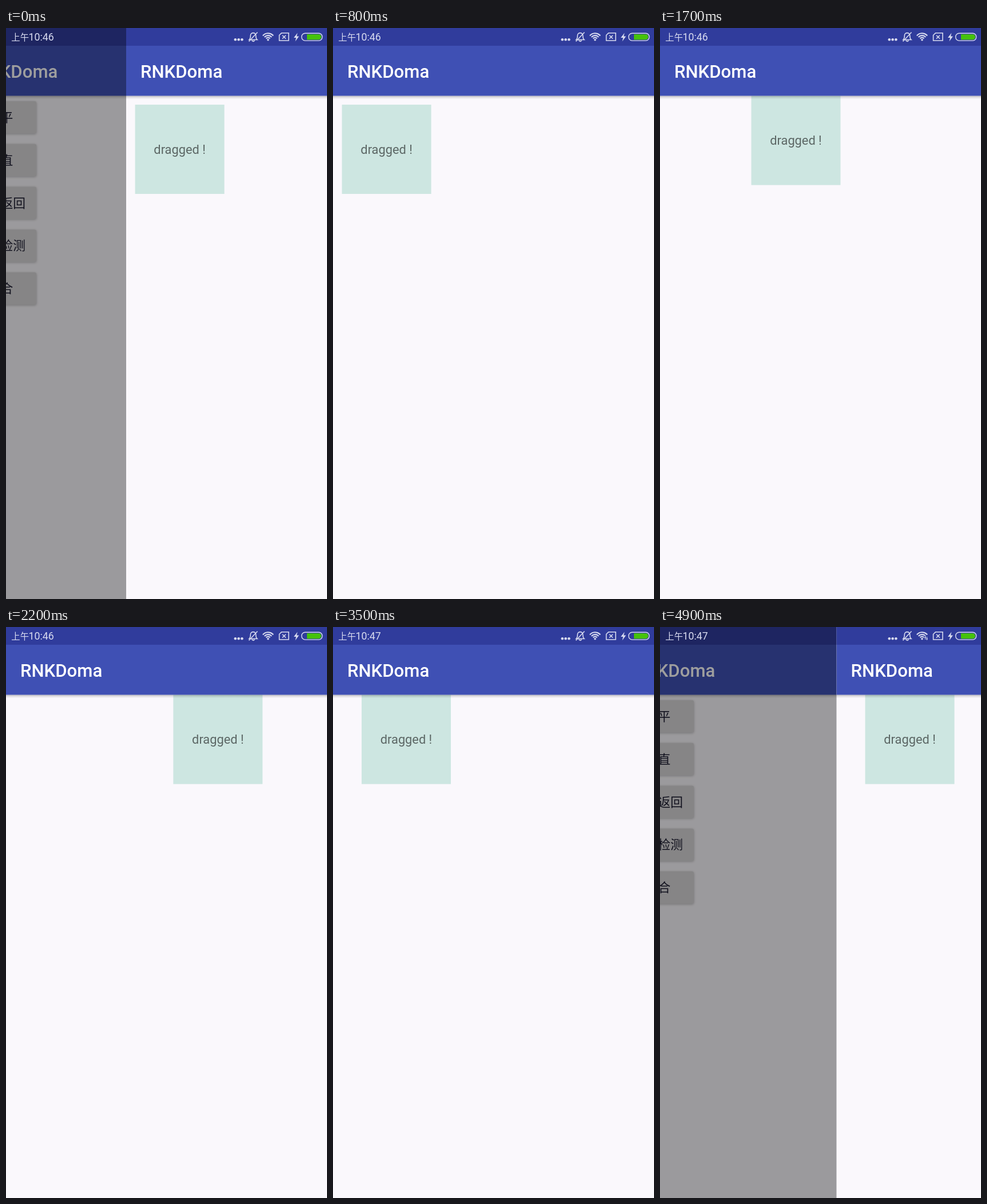
An HTML page with a canvas that plays this animation: 561x998 px, repeating every 5000 ms.

```html
<!DOCTYPE html>
<html lang="zh">
<head>
<meta charset="utf-8">
<title>Drag demo</title>
<style>
html, body { margin: 0; width: 100%; height: 100%; overflow: hidden; background: #faf8fc; }
canvas { display: block; }
</style>
</head>
<body>
<canvas id="stage" width="561" height="998"></canvas>
<script>
const W = 561, H = 998, LOOP = 5000, STEP = 100;
const STATUS_H = 31, BAR_BOTTOM = 118.5, BOX = 156, HOME = 15.6;
const TITLE = 'RNKDoma';
const LABELS = ['水平', '垂直', '移动返回', '边缘检测', '综合'];
const PAPER = '#faf8fc', STATUS = '#303c9c', ICON = '#d9dcf0';
const CJK = '"Noto Sans CJK SC", "Noto Sans CJK", sans-serif';
const SANS = 'Roboto, ' + CJK;
const ctx = document.getElementById('stage').getContext('2d');

const clamp = u => Math.min(1, Math.max(0, u));
const smooth = u => u * u * (3 - 2 * u);
const easeOut = u => 1 - (1 - u) ** 2.24;

// The finger's turning points: each swing starts and ends at rest.
const turns = [
  { at: 1200, x: HOME }, { at: 1600, x: 244 }, { at: 1800, x: 75 },
  { at: 2100, x: 307.5 }, { at: 2400, x: 249 }, { at: 2500, x: 252 }
];

function boxX(t) {
  let x = HOME;
  for (let i = 1; i < turns.length; i++) {
    const a = turns[i - 1], b = turns[i];
    x += (b.x - a.x) * smooth(clamp((t - a.at) / (b.at - a.at)));
  }
  return x + (50 - x) * easeOut(clamp((t - 2700) / 300));
}

// The page slides in with a decaying speed and is swiped away at the end.
function pageX(t) {
  if (t < 600) return 210 * Math.exp(-t / 150);
  return t < 4900 ? 0 : W * .55;
}

function rect(x, y, w, h, color) {
  ctx.fillStyle = color;
  ctx.fillRect(x, y, w, h);
}

function text(str, x, y, font, color, align = 'left') {
  ctx.font = font;
  ctx.fillStyle = color;
  ctx.textAlign = align;
  ctx.fillText(str, x, y);
}

function pill(x, y, w, h, r) {
  ctx.beginPath();
  ctx.roundRect(x, y, w, h, r);
}

function poly(...points) {
  ctx.beginPath();
  points.forEach(([x, y]) => ctx.lineTo(x, y));
  ctx.closePath();
}

function line(x0, y0, x1, y1) {
  ctx.beginPath();
  ctx.moveTo(x0, y0);
  ctx.lineTo(x1, y1);
  ctx.stroke();
}

function disc(x, y, r) {
  ctx.beginPath();
  ctx.arc(x, y, r, 0, Math.PI * 2);
  ctx.fill();
}

function clipped(left, right, shift, paint) {
  ctx.save();
  ctx.beginPath();
  ctx.rect(left, 0, right - left, H);
  ctx.clip();
  ctx.translate(shift, 0);
  paint();
  ctx.restore();
}

function bars() {
  const shade = ctx.createLinearGradient(0, BAR_BOTTOM, 0, BAR_BOTTOM + 6);
  shade.addColorStop(0, 'rgba(0,0,0,.28)');
  shade.addColorStop(.4, 'rgba(0,0,0,.11)');
  shade.addColorStop(1, 'rgba(0,0,0,0)');
  rect(0, BAR_BOTTOM, W, 6, shade);
  rect(0, 0, W, BAR_BOTTOM, '#3f50b4');
  rect(0, 0, W, STATUS_H, STATUS);
  text(TITLE, 25, 87, '500 31.16px ' + SANS, '#fff');
}

function menuPage() {
  rect(0, 0, W, H, PAPER);
  LABELS.forEach((label, i) => {
    const y = 128 + 74.8 * i;
    ctx.save();
    ctx.shadowColor = 'rgba(0,0,0,.25)';
    ctx.shadowBlur = 4;
    ctx.shadowOffsetY = 1;
    ctx.fillStyle = '#d7d6d8';
    pill(6, y, 125, 56.5, 3);
    ctx.fill();
    ctx.restore();
    text(label, 68.5, Math.round(y + 36), '21.8px ' + CJK, '#1c1c30', 'center');
  });
  bars();
}

function dragPage(t) {
  const x = boxX(t), y = t < 1300 ? 134 : BAR_BOTTOM;
  rect(0, 0, W, H, PAPER);
  rect(x, y, BOX, BOX, '#cde6e1');
  text('dragged !', x + BOX / 2, Math.round(y + 85.7), '21.8px ' + SANS, '#5c6765', 'center');
  bars();
}

function bell() {
  ctx.lineWidth = 1.6;
  ctx.beginPath();
  ctx.moveTo(425, 20.5);
  ctx.quadraticCurveTo(427.3, 18.5, 427.3, 13.5);
  ctx.bezierCurveTo(427.3, 7, 436.7, 7, 436.7, 13.5);
  ctx.quadraticCurveTo(436.7, 18.5, 439, 20.5);
  ctx.closePath();
  ctx.stroke();
  ctx.beginPath();
  ctx.arc(432, 21, 2.3, .2, Math.PI - .2);
  ctx.stroke();
  line(439.5, 7.5, 424.5, 23.5);
}

// A small vertical arrow; dir is -1 for up and 1 for down.
function arrow(x, dir) {
  const tip = 19.5 + 3.5 * dir;
  poly([x - 1.6, tip - 3 * dir], [x, tip], [x + 1.6, tip - 3 * dir]);
  ctx.fill();
  line(x, tip, x, tip - 6 * dir);
}

function wifi(busy) {
  ctx.lineWidth = 2.1;
  for (let i = 0; i < 3; i++) {
    ctx.beginPath();
    ctx.arc(458, 21.5, 4.6 + 3.8 * i, -Math.PI * .77, -Math.PI * .23);
    ctx.stroke();
  }
  disc(458, 20.7, 1.8);
  if (!busy) return;
  rect(461.5, 15.5, 7, 8, STATUS);
  ctx.fillStyle = ICON;
  ctx.lineWidth = 1;
  arrow(463.6, -1);
  arrow(466.5, 1);
}

function simCard() {
  ctx.lineWidth = 1.6;
  poly([481.5, 8.8], [494, 8.8], [494, 22], [477.6, 22], [477.6, 12.5]);
  ctx.stroke();
  for (const d of [-3, 3]) line(486 - d, 12.7, 486 + d, 18.7);
}

function battery() {
  poly([509.5, 8.5], [503, 17], [507, 17], [505.5, 23.5], [512, 14.5], [508, 14.5]);
  ctx.fill();
  ctx.lineWidth = 1.4;
  pill(516.7, 9.3, 36, 12.8, 6);
  ctx.stroke();
  ctx.fillStyle = '#45c20c';
  pill(526, 11, 25, 9.4, [0, 4.5, 4.5, 0]);
  ctx.fill();
}

function statusBar(t) {
  text('上午', 9.3, 22, '15.4px ' + CJK, ICON);
  text(t < 3500 ? '10:46' : '10:47', 39.5, 22.4, '17.8px ' + SANS, ICON);
  ctx.fillStyle = ctx.strokeStyle = ICON;
  for (let i = 0; i < 3; i++) disc(400.8 + i * 5.8, 20.2, 2.3);
  bell();
  wifi((t >= 1800 && t < 2100) || t >= 4700);
  simCard();
  battery();
}

function draw(time) {
  const t = Math.floor((time % LOOP) / STEP) * STEP;
  const x = pageX(t);
  if (x > 0) {
    // The page beneath moves at a fraction of the speed of the one on top.
    const lag = t < 600 ? .222 : .285;
    clipped(0, x, (x - W) * lag, menuPage);
    rect(0, 0, x, H, 'rgba(0,0,0,.38)');
  }
  clipped(x, W, x, () => dragPage(t));
  statusBar(t);
}

const start = performance.now();
function tick() {
  draw(performance.now() - start);
  requestAnimationFrame(tick);
}
tick();
</script>
</body>
</html>
```
